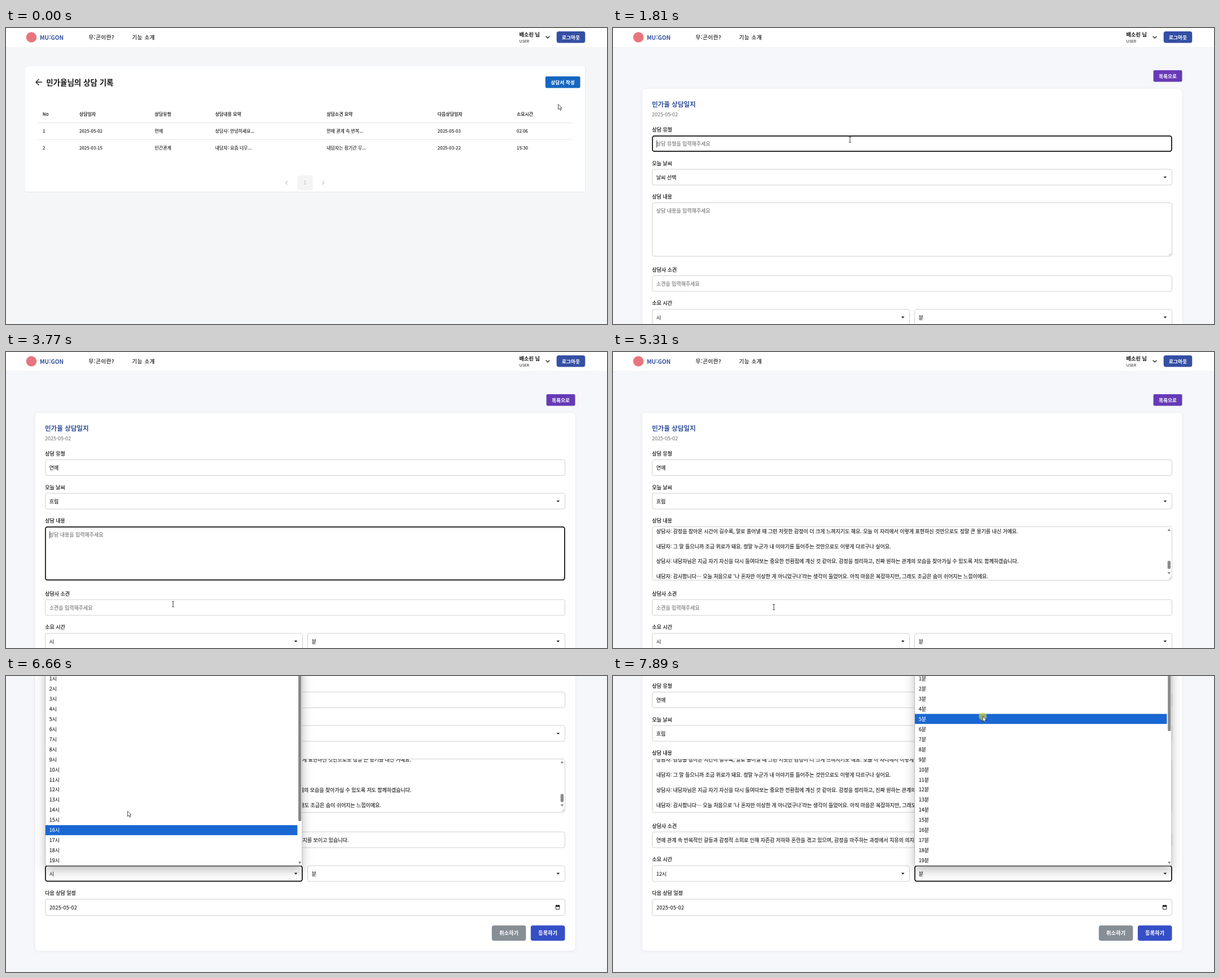
Recreate the animation shown at these times as an HTML page. Size 1065 by 526 pixels, loop 7.99 s.

```html
<!DOCTYPE html>
<html lang="ko">
<head>
<meta charset="utf-8">
<title>상담 기록</title>
<style>
  html, body { margin: 0; width: 100%; height: 100%; overflow: hidden; background: #f5f7fb; }
  svg { display: block; width: 100%; height: 100%; }
  text { font-family: "Noto Sans CJK KR", "Noto Sans KR", "Noto Sans", sans-serif; white-space: pre; }
  .b { font-weight: 700; }
  .m { stroke: currentColor; stroke-width: .24px; }
  .v { stroke: currentColor; stroke-width: .12px; }
  .sp { letter-spacing: .65px; }
  .btn { font-weight: 700; letter-spacing: .25px; text-anchor: middle; stroke: currentColor; stroke-width: .12px; }
  .cell { letter-spacing: .084px; }
  .date { letter-spacing: .3px; }
  .box { fill: #fff; stroke: #cbcbcb; stroke-width: .9; }
  .ring { fill: none; stroke: #101010; stroke-width: 1.7; }
  .line { fill: none; stroke-linecap: round; stroke-linejoin: round; }
  .paper { filter: drop-shadow(0 .7px .7px rgba(0,0,0,.32)); }
  .card { filter: drop-shadow(0 1px 3px rgba(0,0,0,.06)); }
  .down { filter: drop-shadow(0 9px 10px rgba(0,0,0,.2)); }
  .up { filter: drop-shadow(0 8px 9px rgba(0,0,0,.25)); }
  .menu { fill: #fff; stroke: #a5a5a5; stroke-width: .7; }
</style>
</head>
<body>
<svg id="stage" viewBox="0 0 1065 526" preserveAspectRatio="none"></svg>
<script>
const LOOP = 7990, ROW = 17.97, INK = '#161616', HINT = '#757575', BLUE = '#1967d2';
const stage = document.getElementById('stage');

// y is the optical middle of the line
const text = (x, y, s, size = 8.96, fill = INK, cls = 'v') =>
  `<text x="${x}" y="${(y + size * .37).toFixed(2)}" font-size="${size}" fill="${fill}" color="${fill}" class="${cls}">${s}</text>`;
const rect = (x, y, w, h, r, attrs) =>
  `<rect x="${x}" y="${y}" width="${w}" height="${h}" rx="${r}" ${attrs}/>`;
const path = (d, attrs) => `<path d="${d}" ${attrs}/>`;
const at = (from, to, body) => `<g data-on="${from} ${to}">${body}</g>`;
const swap = (time, before, after) => at(0, time, before) + at(time, LOOP, after);

const button = (x, y, w, h, fill, s, size = 8.4, r = 3, cls = '') =>
  rect(x, y, w, h, r, `fill="${fill}" class="${cls}"`) + text(x + w / 2 + .1, y + h / 2 + .2, s, size, '#fff', 'btn');
const field = (y, h = 28, x = 69.5, w = 921) => rect(x, y, w, h, 3.4, 'class="box"');
const ring = (from, to, y, h = 27.2, x = 69.9, w = 920) =>
  at(from, to, rect(x, y + .4, w, h, 3.6, 'class="ring"'));
const label = (y, s) => text(69.3, y, s, 8.96, INK, 'm');
const caret = (x, y) => rect(x, y - 6.5, .8, 13, 0, 'fill="#222"');
const arrow = (x, y) => path(`M${x - 2.8} ${y - 1.4}h5.6l-2.8 2.9z`, 'fill="#111"');
const tip = (x, y, dir) => path(`M${x - 2.7} ${y + 2 * dir}h5.4l-2.7 ${-4 * dir}z`, 'fill="#858585"');

const header = () =>
  rect(0, 0, 1065, 34, 0, 'fill="#fff"') + rect(0, 34, 1065, .6, 0, 'fill="#eceef1"') +
  '<circle cx="45" cy="16.5" r="9.3" fill="#e8757e"/>' +
  text(60, 17, 'MU:GON', 10.08, '#304f9f', 'b') +
  text(146.6, 16.5, '무:곤이란?', 9.4, INK, 'sp m') +
  text(223.6, 16.5, '기능 소개', 9.4, INK, 'sp m') +
  text(909.6, 11.5, '배소린 님', 9.2, '#111', 'b') +
  text(909.8, 23.3, 'USER', 6.72, INK, 'cell') +
  path('M957 15l3 3 3-3', 'class="line" stroke="#222" stroke-width="1.3"') +
  button(975.7, 6, 50.6, 20.6, '#344fa4', '로그아웃', 8.5, 4);

const columns = [65, 130, 263.6, 370.8, 568.3, 764.8, 905];
const row = (y, cells, cls) => cells.map((s, i) => text(columns[i], y, s, 7.84, INK, 'cell ' + cls)).join('');

const records = () =>
  rect(0, 34.6, 1065, 491.4, 0, 'fill="#f5f6f8"') +
  rect(34, 68, 992.3, 223.5, 2.4, 'fill="#fff" class="paper"') +
  path('M63.5 96.2H53M58 91.2l-5 5 5 5', 'class="line" stroke="#222" stroke-width="1.4"') +
  text(71.2, 96.5, '민가율님의 상담 기록', 13.5, '#151515', 'b') +
  button(955.9, 86, 61.5, 20.5, '#1667c2', '상담서 작성', 8.4, 2.3, 'paper') +
  row(153, ['No', '상담일자', '상담유형', '상담내용 요약', '상담소견 요약', '다음상담일자', '소요시간'], 'm') +
  row(183.3, ['1', '2025-05-02', '연애', '상담사: 안녕하세요...', '연애 관계 속 반복...', '2025-05-03', '02:06'], 'v') +
  row(213, ['2', '2025-03-15', '인간관계', '내담자: 요즘 너무...', '내담자는 장기간 무...', '2025-03-22', '15:30'], 'v') +
  path('M56 168.5H1004M56 198H1004', 'stroke="#dedede" stroke-width=".8"') +
  rect(516.5, 262, 27, 26.5, 2.3, 'fill="#f4f4f4"') +
  text(527.4, 275.3, '1', 8.4, '#bdbdbd') +
  path('M498.6 272.2l-2.8 2.9 2.8 2.9M560.6 272.2l2.8 2.9-2.8 2.9', 'class="line" stroke="#a2a2a2" stroke-width="1"');

const talk = [
  '상담사: 감정을 참아온 시간이 길수록, 말로 풀어낼 때 그런 저릿한 감정이 더 크게 느껴지기도 해요. 오늘 이 자리에서 이렇게 표현하신 것만으로도 정말 큰 용기를 내신 거예요.',
  '내담자: 그 말 들으니까 조금 위로가 돼요. 정말 누군가 내 이야기를 들어주는 것만으로도 이렇게 다르구나 싶어요.',
  '상담사: 내담자님은 지금 자기 자신을 다시 들여다보는 중요한 전환점에 계신 것 같아요. 감정을 정리하고, 진짜 원하는 관계의 모습을 찾아가실 수 있도록 저도 함께하겠습니다.',
  '내담자: 감사합니다… 오늘 처음으로 ‘나 혼자만 이상한 게 아니었구나’라는 생각이 들었어요. 아직 마음은 복잡하지만, 그래도 조금은 숨이 쉬어지는 느낌이에요.'
];

const notes = () =>
  `<g clip-path="url(#area)"><g id="talk">${talk.map((s, i) => text(76.8, 318.3 + 26.9 * i, s)).join('')}` +
  at(3960, 4460, caret(657, 399)) + '</g></g>' +
  rect(981, 311.2, 9, 93.6, 2, 'fill="#fff"') + tip(985.4, 316, 1) + tip(985.4, 393, -1) +
  rect(982.7, 371, 5.4, 14.5, 2.6, 'fill="#8b8b8b" id="thumb"');

const typed = [[2100, '여'], [2150, '연'], [2210, '연애']];

const form = () =>
  button(957.7, 74.9, 50.7, 20.6, '#673ab7', '목록으로', 8.4, 2.3, 'paper') +
  rect(52, 108.3, 956.3, 543, 6, 'fill="#fff" class="card"') +
  text(69, 135.3, '민가율 상담일지', 11.55, '#2f4e99', 'b') +
  text(69, 154, '2025-05-02', 8.96, '#7d7d7d') +
  label(180.8, '상담 유형') + field(191.5) + ring(1710, 2560, 191.5) +
  at(0, 2100, text(76.8, 206, '상담 유형을 입력해주세요', 8.96, HINT)) +
  at(1710, 2100, caret(77, 206)) +
  typed.map(([t, s], i) => at(t, i + 1 < typed.length ? typed[i + 1][0] : LOOP, text(76.8, 206, s))).join('') +
  label(240.2, '오늘 날씨') + field(251) + ring(2560, 3500, 251) +
  swap(3130, text(76.8, 265.5, '날씨 선택'), text(76.8, 265.5, '흐림')) + arrow(978.4, 265.3) +
  label(299.8, '상담 내용') + field(310.5, 95) +
  swap(3960, text(76.8, 325, '상담 내용을 입력해주세요', 8.96, HINT), notes()) +
  at(3500, 3960, caret(77, 325)) +
  path('M984.8 404l4.3-4.3M987.2 404l1.9-1.9', 'stroke="#777" stroke-width=".6"') +
  ring(3500, 4800, 310.5, 94.2) +
  label(429.5, '상담사 소견') + field(440) + ring(5390, 6180, 440) +
  swap(5450, text(76.8, 454.6, '소견을 입력해주세요', 8.96, HINT),
    text(76.8, 454.6, '연애 관계 속 반복적인 갈등과 감정적 소외로 인해 자존감 저하와 혼란을 겪고 있으며, 감정을 마주하는 과정에서 치유의 의지를 보이고 있습니다.')) +
  label(489, '소요 시간') + field(500, 28, 69.5, 456) + field(500, 28, 534.5, 456) +
  ring(6180, 7300, 500, 27.2, 69.9, 455) + ring(7300, LOOP, 500, 27.2, 534.9, 455) +
  swap(7000, text(76.8, 514.3, '시'), text(76.8, 514.3, '12시')) + arrow(513.6, 514.2) +
  text(541.7, 514.3, '분') + arrow(978.4, 514.2) +
  label(548.5, '다음 상담 일정') + field(559.5, 29) +
  text(77, 574.5, '2025-05-02', 8.96, INK, 'date v') +
  rect(974.4, 571, 6.4, 6.6, .6, 'fill="none" stroke="#111" stroke-width=".9"') +
  path('M974 570.6h7.2v2.3h-7.2zM975.2 569.6h1v1h-1zM979 569.6h1v1h-1z', 'fill="#111"') +
  button(860.9, 606.3, 60.5, 27.3, '#868e96', '취소하기', 8.96, 4) +
  button(929.9, 606.3, 60.6, 27.3, '#364fc7', '등록하기', 8.96, 4);

// A menu: its box, rows centred from y0, and a movable highlighted row
const menus = [
  { on: [2580, 3130], x: 69.5, w: 920.7, top: 279, end: 369.5, y0: 289, bar: 0, cls: 'down',
    items: ['날씨 선택', '맑음', '흐림', '비', '눈'] },
  { on: [6220, 7000], x: 69.5, w: 455.3, top: -40, end: 337, y0: 4.5, bar: 258, cls: 'up',
    items: Array.from({ length: 19 }, (_, i) => i + 1 + '시') },
  { on: [7320, LOOP], x: 534.5, w: 455.5, top: -40, end: 337, y0: 4.5, bar: 98, cls: 'up',
    items: Array.from({ length: 19 }, (_, i) => i + 1 + '분') }
];
const menuRow = (m, i, fill) => text(m.x + 7.3, m.y0 + i * ROW, m.items[i], 8.96, fill);
const drawMenu = m => at(...m.on,
  rect(m.x, m.top, m.w, m.end - m.top, 1.5, `class="menu ${m.cls}"`) +
  m.items.map((_, i) => menuRow(m, i, INK)).join('') + '<g class="pick"></g>' +
  (m.bar ? rect(m.x + m.w - 6.8, -20, 5.2, m.bar + 20, 2.6, 'fill="#898989"') + tip(m.x + m.w - 4.2, 332, -1) : ''));

stage.innerHTML =
  '<clipPath id="area"><rect x="70" y="311" width="911" height="94"/></clipPath>' +
  '<rect width="1065" height="526" fill="#f5f7fb"/>' +
  `<g id="page">${header()}${at(0, 520, records())}${at(520, LOOP, form())}</g>` +
  menus.map(drawMenu).join('') +
  '<g id="mouse"><circle id="click" r="7" fill="#e3dc35" fill-opacity=".62"/>' +
  path('M0 0V9.3L2.2 7.3 3.8 10.8 5.3 10.1 3.8 6.7H6.6Z', 'id="point" fill="#fff" stroke="#222" stroke-width=".8" stroke-linejoin="round"') +
  path('M-2-5Q0-5 0-4Q0-5 2-5M0-4V4M-2 5Q0 5 0 4Q0 5 2 5', 'id="beam" fill="none" stroke="#222" stroke-width=".9"') + '</g>';

const track = [
  [0, 978.6, 135.5], [30, 978.6, 135.5], [330, 988, 97], [1110, 988, 97], [1450, 640, 256],
  [1660, 420, 198.5], [2300, 420, 198.5], [2500, 310, 266], [2580, 310, 266], [2760, 298.8, 327],
  [3500, 298.8, 327], [3770, 296, 448], [3930, 296, 448], [3931, 1046, 292], [4050, 285, 453.3],
  [5480, 285, 453.3], [5830, 173.6, 431], [6080, 208, 349], [6300, 208, 349], [6590, 214, 268],
  [6660, 215.4, 240.5], [6800, 216, 203], [7050, 216, 203], [7270, 655, 350], [7380, 655, 350],
  [7680, 655, 108], [7740, 655, 108], [7830, 655.3, 71.8], [LOOP, 655.3, 71.8]
];
const scrolls = [[0, 0], [5540, 0], [5830, 127], [5980, 163], [LOOP, 163]];
const clicks = [380, 1670, 2530, 3060, 3500, 5340, 6130, 6960, 7270, 7860];

// Smooth curve through the points; rests stay at rest
function along(points, t, k) {
  const last = points.length - 1;
  let i = 0;
  while (i < last - 1 && t >= points[i + 1][0]) i++;
  const slope = j => {
    if (j < 1 || j >= last) return 0;
    const [a, b, c] = [points[j - 1], points[j], points[j + 1]];
    return (b[k] - a[k]) * (c[k] - b[k]) <= 0 ? 0 : (c[k] - a[k]) / (c[0] - a[0]);
  };
  const p = points[i], q = points[i + 1], d = q[0] - p[0], u = (t - p[0]) / d, v = 1 - u;
  return p[k] * v * v * (1 + 2 * u) + q[k] * u * u * (3 - 2 * u) +
    d * u * v * (slope(i) * v - slope(i + 1) * u);
}

const get = id => document.getElementById(id);
const [page, mouse, click, point, beam, talkText, thumb] =
  ['page', 'mouse', 'click', 'point', 'beam', 'talk', 'thumb'].map(get);
const timed = [...stage.querySelectorAll('[data-on]')].map(el => [el, ...el.dataset.on.split(' ').map(Number)]);
const picks = [...stage.querySelectorAll('.pick')];
const within = (t, [from, to]) => t >= from && t < to;
const show = (el, on) => { el.style.display = on ? '' : 'none'; };
const move = (el, x, y) => el.setAttribute('transform', `translate(${x.toFixed(2)} ${y.toFixed(2)})`);

// The highlighted row trails the pointer slightly
function pick(m, el, t) {
  const y = along(track, t - 65, 2);
  const i = y < m.end && t > m.on[0] + 65 ? Math.round((y - m.y0) / ROW) : -1;
  if (el.row === i) return;
  el.row = i;
  el.innerHTML = m.items[i] === undefined ? '' :
    rect(m.x + .5, m.y0 + i * ROW - 9, m.bar ? m.w - 9 : m.w - 1, 17.8, 0, `fill="${BLUE}"`) + menuRow(m, i, '#fff');
}

function draw(t) {
  for (const [el, from, to] of timed) show(el, within(t, [from, to]));
  const scroll = along(scrolls, t, 1), x = along(track, t, 1), y = along(track, t, 2);
  move(page, 0, -scroll);
  const inner = Math.min(1, Math.max(0, (t - 5500) / 120));
  move(talkText, 0, -6.4 * inner);
  move(thumb, 0, 1.5 * inner);
  menus.forEach((m, i) => { if (within(t, m.on)) pick(m, picks[i], t); });

  const py = y + scroll;
  const typing = t >= 520 && x > 70 && x < 990 && !menus.some(m => within(t, m.on)) &&
    [[191, 219.5], [310.5, 405], [440, 468]].some(r => within(py, r));
  move(mouse, x, y);
  show(beam, typing);
  show(point, !typing);
  show(click, clicks.some(c => within(t, [c, c + 130])));
}

const start = performance.now();
function tick(now) {
  draw(Math.max(0, now - start) % LOOP);
  requestAnimationFrame(tick);
}
draw(0);
requestAnimationFrame(tick);
</script>
</body>
</html>
```
